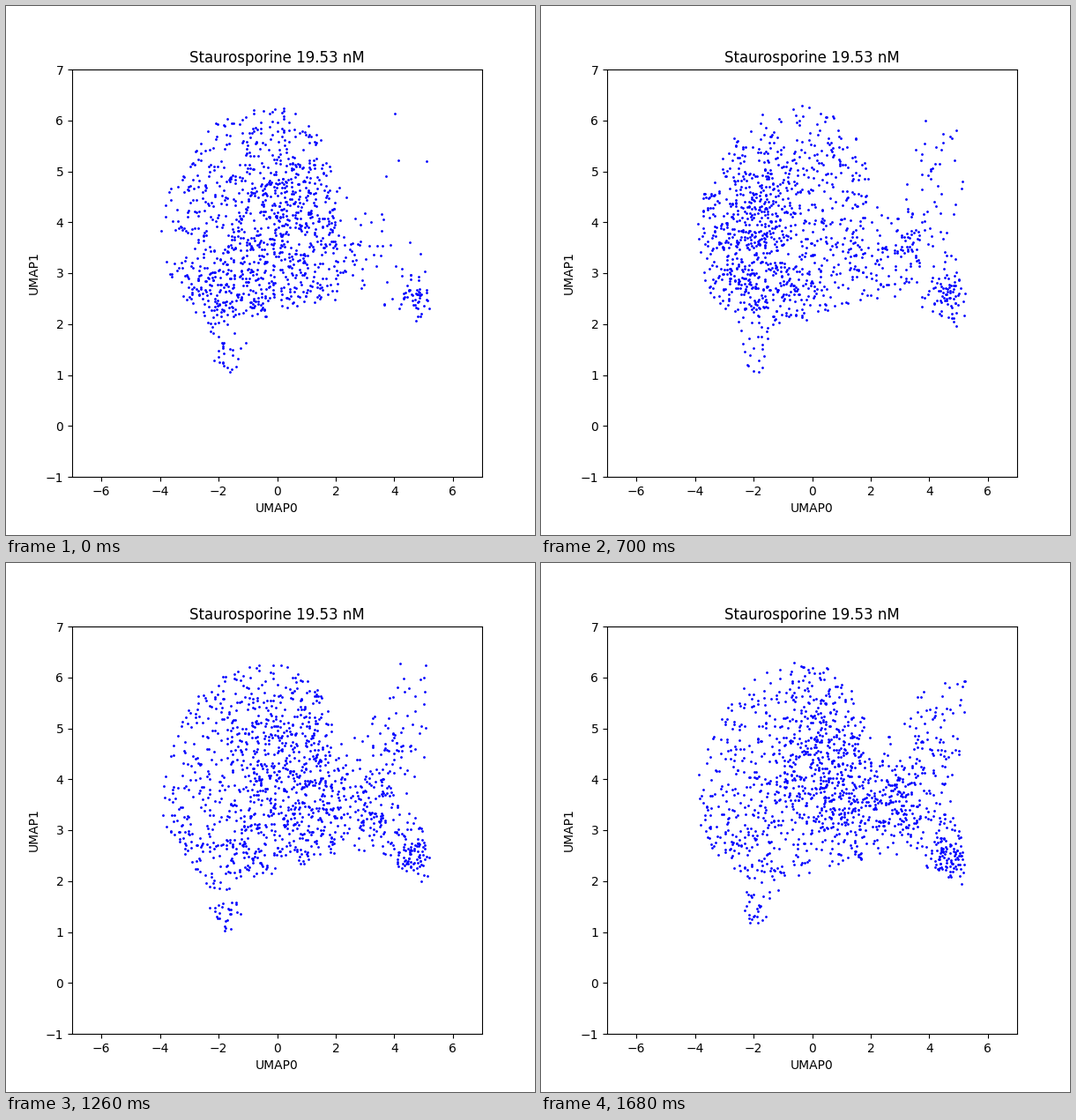
A matplotlib script for the animation above (1820 ms loop, 600 px wide and 600 px high).

```python
import numpy as np
import matplotlib.pyplot as plt
from matplotlib.animation import FuncAnimation
from matplotlib.path import Path

FRAMES, STEP_MS = 13, 140

WING = Path([(0.5, 5.0), (-0.6, 2.05), (1.4, 2.42), (3.2, 2.52), (5.15, 1.88),
             (5.25, 2.3), (4.95, 3.6), (5.35, 6.2), (4.1, 6.35), (3.1, 5.2),
             (2.3, 4.7), (1.6, 5.4)])
STEM = Path([(-2.7, 2.4), (-2.2, 1.05), (-1.5, 0.97), (-1.05, 1.4),
             (-1.2, 2.4)])


def inside(p):
    """True for points in the tilted main lobe, the right wing or the stem."""
    u = (p[:, 0] + 1) / 2.95
    v = (p[:, 1] - 4.15 - 0.44 * u) / 2.1
    lobe = u**2 + v**2 < 1
    return lobe | WING.contains_points(p) | STEM.contains_points(p)


def cells(step):
    rng = np.random.default_rng(100 + step)
    t = step / (FRAMES - 1)
    surge = np.exp(-((step - 4) / 3) ** 2)

    def keep(points, n):
        return points[inside(points)][:int(n)]

    def cluster(n, center, spread):
        return keep(rng.normal(center, spread, (int(8 * n), 2)), n)

    lobe = rng.uniform((-4.3, 2.0), (2.0, 6.5), (2500, 2))
    lobe += rng.normal(0, 0.15, lobe.shape)
    points = np.vstack([
        keep(lobe, 530),
        # crowd swings to the left and back
        cluster(320, (0.4 - 2.7 * surge, 4.3 - 0.4 * surge), (1.0, 0.9)),
        # lower rim thins out
        cluster(160 - 120 * t, (-1.3, 2.7), (1.3, 0.35)),
        # neck, bridge, tail and arm fill up
        cluster(60 + 60 * t, (1.9, 3.6), (0.8, 0.6)),
        cluster(20 + 120 * t, (3.1, 3.4), (0.6, 0.5)),
        cluster(55 + 55 * t, (4.65, 2.5), (0.4, 0.35)),
        cluster(5 + 85 * t, (4.2, 4.95), (0.6, 0.8)),
        cluster(32 - 20 * surge, (-1.9, 1.35), (0.4, 0.4)),
    ])
    return points + rng.normal(0, 0.02, points.shape)


fig, ax = plt.subplots(figsize=(6, 6), dpi=100)
dots = ax.scatter(*cells(0).T, s=1, c="blue")
ax.set(xlim=(-7, 7), ylim=(-1, 7), xlabel="UMAP0", ylabel="UMAP1",
       title="Staurosporine 19.53 nM")


def update(step):
    dots.set_offsets(cells(step))
    return [dots]


anim = FuncAnimation(fig, update, frames=FRAMES, interval=STEP_MS,
                     repeat=True, repeat_delay=0)
plt.show()
```
